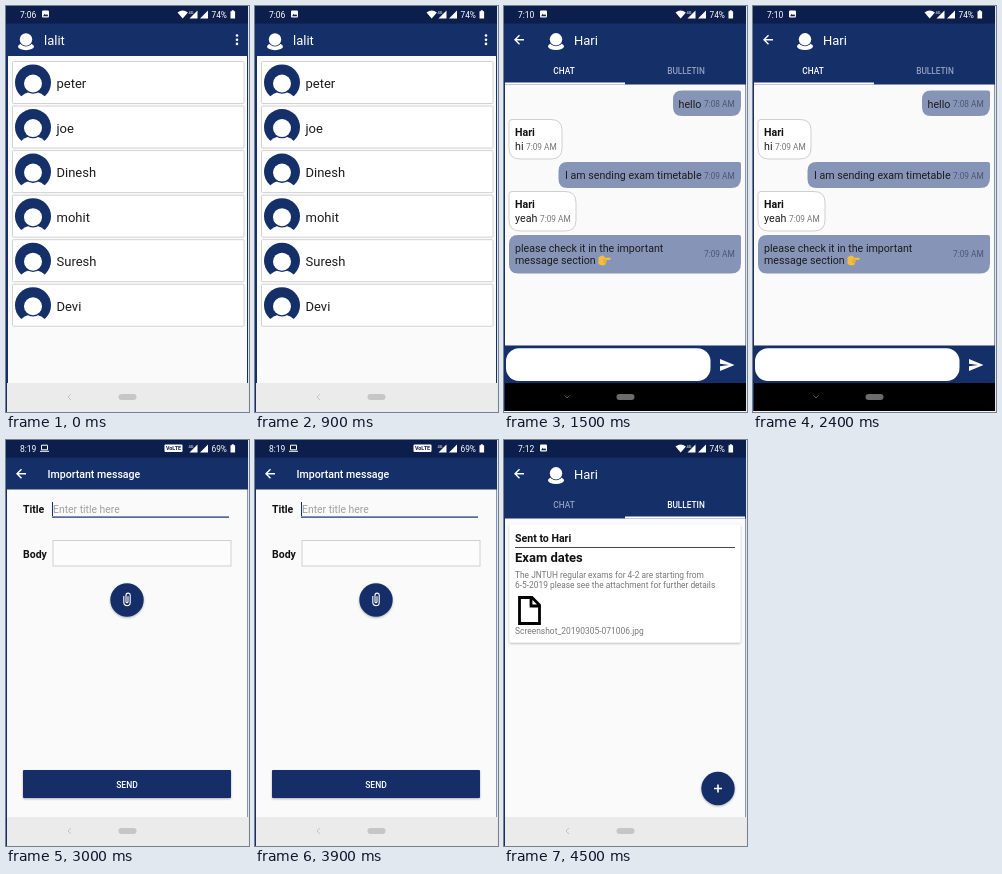
An HTML page for the animation above (6000 ms loop, 243 px wide and 406 px high).

```html
<!DOCTYPE html>
<html lang="en">
<head>
<meta charset="utf-8">
<title>Messaging app screens</title>
<style>
  html, body { margin: 0; width: 100%; height: 100%; overflow: hidden; background: #fafafa; }
  svg { display: block; width: 100vw; height: 100vh; }
  text { font-family: Roboto, "Noto Sans", sans-serif; white-space: pre; }
</style>
</head>
<body>
<svg id="stage" viewBox="0 0 243 406" preserveAspectRatio="none">
  <defs>
    <filter id="shadow" x="-20%" y="-20%" width="140%" height="150%">
      <feDropShadow dx="0" dy="1" stdDeviation="1.2" flood-opacity=".3"/>
    </filter>
  </defs>
</svg>
<script>
const NAVY = '#152f68', DARK = '#0c1f4c', PALE = '#93a0c0', BUBBLE = '#8694b7';
const SHOW_MS = 1500;

const rect = (x, y, w, h, fill, more = '') =>
  `<rect x="${x}" y="${y}" width="${w}" height="${h}" fill="${fill}" ${more}/>`;
const circle = (x, y, r, fill, more = '') =>
  `<circle cx="${x}" cy="${y}" r="${r}" fill="${fill}" ${more}/>`;
const path = (d, fill, more = '') => `<path d="${d}" fill="${fill}" ${more}/>`;
const line = (d, color, width = 1.3) =>
  path(d, 'none', `stroke="${color}" stroke-width="${width}"`);
const text = (x, y, size, str, fill = '#1c1c1c', weight = 400, anchor = 'start') =>
  `<text x="${x}" y="${y}" font-size="${size}" fill="${fill}" font-weight="${weight}" text-anchor="${anchor}">${str}</text>`;

function statusBar(time, level, laptop) {
  const icon = laptop
    ? line('M35.5 5.2h6v4.6h-6zM34 11.3h9', '#fff', 1)
    : rect(36, 4.5, 7, 7, '#fff', 'rx="1"') + path('M37 10.3l1.8-2.5 1.2 1.4 1-1.1 1.4 2.2z', DARK);
  const network = laptop
    ? rect(158.5, 4.5, 18, 7.5, '#fff', 'rx="1"') + text(167.5, 10.3, 5.4, 'VoLTE', DARK, 700, 'middle')
    : path('M171.5 6.6q5.2-4 10.4 0l-5.2 6z', '#fff');
  return rect(0, 0, 242, 17.5, DARK) + text(14, 11.5, 8.5, time, '#fff') + icon + network +
    text(182.5, 7.5, 4, '4G', '#fff') +
    path('M191.5 4.5v8h-8zM202 4.5v8h-8z', '#fff') +
    text(205.5, 11.5, 8.3, level, '#fff') +
    path('M224.5 5.3h1.3v-1h2v1h1.3v7.2h-4.6z', '#fff');
}

const person = (x, y) =>
  `<ellipse cx="${x}" cy="${y + 5.8}" rx="8" ry="3.7" fill="#fff"/>` +
  circle(x, y - 1.2, 7, NAVY) + circle(x, y - 1.2, 6.2, '#fff');

const avatar = (x, y) =>
  circle(x, y, 18, NAVY) +
  path(`M${x - 13} ${y + 19}v-3q3-6 13-7q10 1 13 7v3z`, '#fff') +
  circle(x, y + 1, 10.3, NAVY) + circle(x, y + 1, 9, '#fff');

const backArrow = line('M20 33.7H11.2M15.5 29.2L11 33.7l4.5 4.5', '#fff', 1.4);

const navBar = (fill, pill, mark, arrow) =>
  rect(1, 377, 241, 29, fill) + rect(112.5, 388, 18, 6, pill, 'rx="3"') + line(arrow, mark, 1);
const lightNav = navBar('#ebebeb', '#c6c6c6', '#c4c4c4', 'M65 388l-3 3 3 3');

const frame = rect(0, 0, 243, 406, '#e4e7ee') + rect(0, 0, 242, 406, NAVY);

const fab = (x, y) => circle(x, y, 16.7, NAVY, 'filter="url(#shadow)"');

function tabHeader(time, active) {
  const color = i => i === active ? '#fff' : PALE;
  return frame + statusBar(time, '74%') + backArrow + person(52, 34.5) +
    text(70, 39, 13, 'Hari', '#fff') +
    text(60, 67.5, 8.3, 'CHAT', color(0), 500, 'middle') +
    text(182, 67.5, 8.3, 'BULLETIN', color(1), 500, 'middle') +
    rect(1 + active * 120, 76.5, 120, 2, '#fff') +
    rect(1, 78.5, 240.5, 299, '#fafafa');
}

function contacts() {
  const names = ['peter', 'joe', 'Dinesh', 'mohit', 'Suresh', 'Devi'];
  const rows = names.map((name, i) => {
    const y = 55.5 + i * 44.55;
    return rect(6.5, y, 231.5, 42, '#fff', 'stroke="#d2d2d2" rx="1"') +
      avatar(27, y + 21) + text(50.5, y + 26.5, 13, name);
  });
  return frame + statusBar('7:06', '74%') + person(20, 34.7) +
    text(38, 39, 13, 'lalit', '#fff') +
    [29.5, 33.7, 37.9].map(y => circle(231, y, 1.3, '#fff')).join('') +
    rect(2, 50, 239, 327, '#fafafa') + rows.join('') + lightNav;
}

function sent(x, y, w, h) {
  return path(`M${x + 9} ${y}h${w - 11}q2 0 2 2v${h - 12}q0 10-10 10h${19 - w}q-9 0-9-9v${18 - h}q0-9 9-9z`, BUBBLE);
}

function received(y, w, h, words, timeX) {
  return path(`M5 ${y + 3}q0-3 3-3h${w - 14}q11 0 11 11v${h - 22}q0 11-11 11h${22 - w}q-11 0-11-11z`, '#fff', 'stroke="#cfcfcf"') +
    text(11, y + 16, 10.6, 'Hari', '#111', 700) +
    text(11, y + 30.5, 10.7, words) + stamp(timeX, y + 30.5);
}

const stamp = (x, y, str = '7:09 AM', fill = '#777') => text(x, y, 8.3, str, fill);

const hand = path('M94.5 251.5q2.5-2.5 5-2l1.5 2.2h5q1.6 1.1 0 2.2h-3.6q1 1.2-.3 2 .6 1.3-.7 1.8 .3 1.5-1.2 1.6h-3.2l-2.5-1.3z', '#f6bd3c') +
  line('M99.3 254h3M99.3 256h2.6', '#c98a20', .6);

function chat() {
  return tabHeader('7:10', 0) +
    sent(169, 84.5, 68, 25.5) + text(174.5, 101.5, 10.7, 'hello') + stamp(200, 101, '7:08 AM', '#4d5673') +
    received(113.5, 53, 39.5, 'hi', 22) +
    sent(54.5, 156, 182.5, 26) + text(61, 173, 10.65, 'I am sending exam timetable') +
    stamp(200, 172.5, '7:09 AM', '#4d5673') +
    received(185.5, 67, 39.5, 'yeah', 36) +
    sent(5, 229, 232, 38.5) + text(11, 246, 10.65, 'please check it in the important') +
    text(11, 258, 10.65, 'message section') + hand + stamp(200, 251, '7:09 AM', '#4d5673') +
    rect(0, 339.5, 242, 37.5, NAVY) + rect(2, 342.3, 204.5, 32.7, '#fff', 'rx="13"') +
    path('M216 353l14.5 6-14.5 6v-4.7l9-1.3-9-1.3z', '#fff') +
    navBar('#000', '#6c6c6c', '#555', 'M60.5 389.5l2.5 2.5 2.5-2.5') +
    rect(0, 405, 243, 1, '#f4f4f4');
}

function compose() {
  const clip = line('M117.8 156v6.5a3.2 3.2 0 0 0 6.4 0v-7.3a2.1 2.1 0 0 0-4.2 0v6.6a1 1 0 0 0 2 0v-5.6', '#fff', 1.1);
  return frame + statusBar('8:19', '69%', true) + backArrow +
    text(41.5, 38, 10.6, 'Important message', '#fff', 500) +
    rect(1, 49.5, 240.5, 328, '#fafafa') +
    text(17, 73, 10.5, 'Title', '#111', 700) +
    text(47, 73, 10.4, 'Enter title here', '#a0a0a0') +
    rect(46, 62, 1, 14, NAVY) + rect(46, 76.5, 177, 1.2, NAVY) +
    text(17, 117.5, 10.5, 'Body', '#111', 700) +
    rect(47, 100.5, 178, 25.5, '#fcfcfc', 'stroke="#d0d0d0"') +
    fab(121, 160) + clip +
    rect(17, 330, 208, 28, NAVY, 'rx="1" filter="url(#shadow)"') +
    text(121, 347.5, 8.5, 'SEND', '#fff', 500, 'middle') + lightNav;
}

function bulletin() {
  return tabHeader('7:12', 1) +
    rect(5.5, 84.5, 231, 118, '#fff', 'rx="1.5" filter="url(#shadow)"') +
    text(11, 102, 10.6, 'Sent to Hari', '#111', 700) +
    rect(11, 107, 220, 1, '#4b4460') +
    text(11, 122, 13, 'Exam dates', '#111', 700) +
    text(11, 138, 8.4, 'The JNTUH regular exams for 4-2 are starting from', '#777') +
    text(11, 147.5, 8.4, '6-5-2019 please see the attachment for further details', '#777') +
    line('M15.5 157.5h12.5l7.5 7.5v18.5h-20zM27 157.5v8.5h8.5', '#000', 2.8) +
    text(11, 194, 8.45, 'Screenshot_20190305-071006.jpg', '#777') +
    fab(214, 348.5) + line('M214 344.5v8M210 348.5h8', '#fff', 1.6) + lightNav;
}

const stage = document.getElementById('stage');
stage.insertAdjacentHTML('beforeend',
  [contacts, chat, compose, bulletin].map(draw => `<g class="screen">${draw()}</g>`).join(''));
const screens = [...stage.querySelectorAll('.screen')];

function render(now) {
  const current = Math.floor(now / SHOW_MS) % screens.length;
  screens.forEach((screen, i) => screen.style.display = i === current ? '' : 'none');
  requestAnimationFrame(render);
}
render(performance.now());
</script>
</body>
</html>
```
